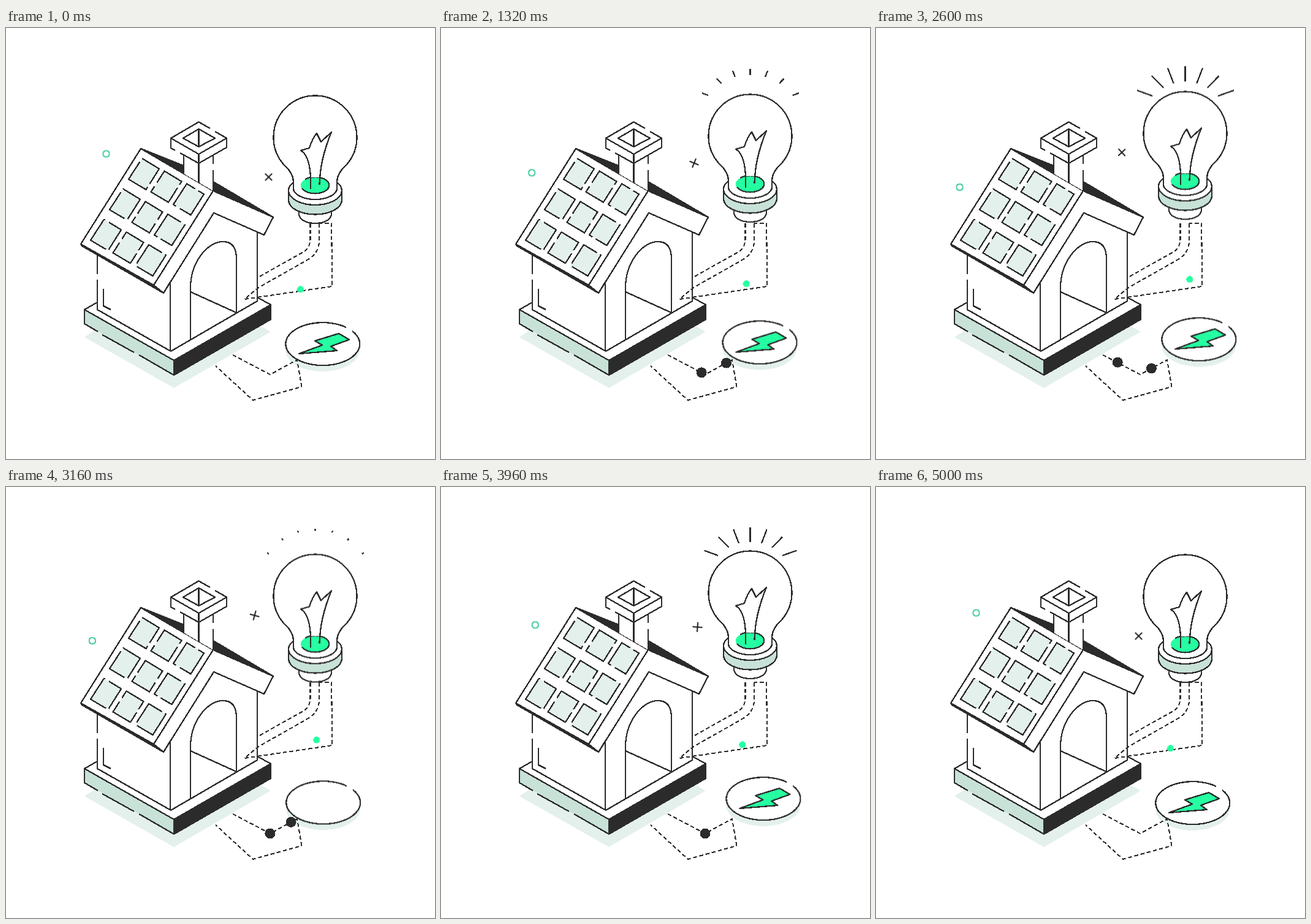
These frames come from a looping animation (700x704 px, 5040 ms). An HTML page:

```html
<!DOCTYPE html>
<html lang="en">
<head>
<meta charset="utf-8">
<title>Solar house</title>
<style>
  html, body { margin: 0; width: 100%; height: 100%; overflow: hidden; background: #fff; }
  svg { display: block; width: 100vw; height: 100vh; }
  svg {
    --ink: #2b2b2b; --mint: #c8e2d8; --pale: #e3f0ec; --neon: #25ffa2;
    --sine: cubic-bezier(.37, 0, .63, 1);
    fill: none; stroke: var(--ink); stroke-width: 2.3; stroke-linejoin: round;
    shape-rendering: crispEdges;
  }
  .white { fill: #fff; }
  .ink { fill: var(--ink); }
  .mint { fill: var(--mint); }
  .pale { fill: var(--pale); }
  .neon { fill: var(--neon); }
  .bare { stroke: none; }
  .dash { stroke-dasharray: 6.5 4; stroke-width: 2.1; }

  .bulb, .disc, .rays line, .bolt { animation: 1680ms var(--sine) -40ms infinite; }
  .bulb { animation-name: lift; }
  .disc { animation-name: hover; }
  .bolt { animation-name: blink; animation-timing-function: step-end; }
  .rays line { animation-name: trim; stroke-dasharray: 1 3; }
  @keyframes lift { 50% { transform: translate(0, -7px); } }
  @keyframes hover { 50% { transform: translate(10.7px, -8px); } }
  @keyframes blink { 0% { opacity: 1; } 88% { opacity: 0; } 94% { opacity: 1; } }
  @keyframes trim {
    0% { stroke-dashoffset: 1.01; }
    50% { stroke-dashoffset: 0; animation-timing-function: cubic-bezier(.42, 0, .7, .97); }
    100% { stroke-dashoffset: -1.01; }
  }

  .drift { animation: drift 5040ms var(--sine) -40ms infinite; }
  .spin { animation: spin 5040ms var(--sine) -40ms infinite; }
  @keyframes drift {
    0%, 100% { transform: translate(var(--from)); }
    50% { transform: translate(var(--to)); }
  }
  @keyframes spin { 50% { transform: rotate(-360deg); } }

  .pulse {
    animation: travel 5040ms var(--sine) infinite, pop 5040ms linear infinite;
    animation-delay: calc(var(--start) - 5080ms);
  }
  @keyframes travel {
    0% { translate: 475px 542px; }
    23.81% { translate: 431px 566px; }
    39.29%, 100% { translate: 372px 534px; }
  }
  @keyframes pop {
    0%, 1% { scale: 0; }
    2.5%, 37.5% { scale: 1; }
    39.29%, 100% { scale: 0; }
  }
</style>
</head>
<body>
<svg viewBox="0 0 700 704">
  <path class="pale bare" d="M128 505 274 588 432 496 274 410Z"/>

  <!-- plinth -->
  <path class="white bare" d="M128 460 274 543 432 452 274 370Z"/>
  <path class="mint bare" d="M128 460 274 543V567L128 483Z"/>
  <path class="ink" d="M274 543 432 452V476L274 567Z"/>
  <path d="M149 448 128 460 274 543V567L217 534M209 530 157 501M150 496 128 483V460M410 440 432 452"/>

  <!-- walls and door -->
  <path class="white bare" d="M149 360V460L269 528 410 446V330L339 290Z"/>
  <path d="M149 372V402M149 411V460L269 528 410 446V334M268 416V528"/>
  <path d="M159 426V454L171 460"/>
  <path d="M301 509V425C301 382 329 349 354 349C370 349 376 360 376 377V465L301 431"/>

  <!-- roof -->
  <path class="white bare" d="M220 197 338 266 436 309 421 338 339 302 257 433 122 353Z"/>
  <path class="ink bare" d="M338 250 436 309 338 267ZM220 197 291 225V239Z"/>
  <path d="M338 266 220 197 122 353 241 420 338 266 436 309 421 338 339 302 257 433 241 420M220 197 290 225M338 251 436 309"/>
  <path class="ink" d="M122 353 241 420 257 433 124 356Z"/>
  <path class="white bare" d="M243 419 261 391 266 416 257 430Z"/>
  <path d="M241 420 262 387M257 433 268 415"/>
  <g id="panels" class="pale"></g>

  <!-- chimney -->
  <path class="white bare" d="M290 200V238L338 266V200Z"/>
  <path d="M290 207V238M338 208V222M338 232V266M314.5 206V253"/>
  <path class="white bare" d="M314.5 153.5 360 180V195L314.5 221 269 196V180Z"/>
  <path d="M341 169 360 180 314.5 206 269 180 314.5 153.5 333 164M269 180V196L276 200M284 204 314.5 221 360 195V180M314.5 206V221"/>
  <path d="M314.5 165 341 180 314.5 194 289 180ZM314.5 165V194"/>

  <g class="disc">
    <ellipse class="pale bare" cx="516.5" cy="526" rx="60.5" ry="35"/>
    <ellipse class="white bare" cx="517.5" cy="516.5" rx="60.5" ry="35"/>
    <path d="M565 495A60.5 35 0 1 1 555 489"/>
    <path class="bolt neon" d="M478 532 516 518 504 511 543 499 560 509 530 520 540 527Z"/>
  </g>

  <g class="dash">
    <path d="M496.5 319V345Q496 360 485 366L410 408"/>
    <path d="M511 319V347C511 366 500 374 488 381L412 424 389 443 532.5 422 531 319H511"/>
    <path d="M370 534 431 566 475 542 482.5 586 403 608 342 552"/>
  </g>

  <g class="ink bare">
    <circle class="pulse" r="8.5" style="--start: 0ms"/>
    <circle class="pulse" r="8.5" style="--start: 990ms"/>
    <circle class="pulse" r="8.5" style="--start: 1980ms"/>
    <circle class="pulse" r="8.5" style="--start: 2820ms"/>
  </g>

  <g class="bulb">
    <g id="rays" class="rays"></g>
    <path class="white" d="M478 299V305C480 314 491 319 504.5 319S529 314 531 305V299"/>
    <path class="mint" d="M461 265V281A43.5 23.5 0 0 0 548 281V265"/>
    <ellipse class="white" cx="504.5" cy="265.5" rx="43.5" ry="23.5"/>
    <path class="white" d="M469 262V252C469 240 462 231 454 224A68 68 0 1 1 555 224C546 232 540 241 540 252V262A35.5 18 0 0 1 469 262"/>
    <ellipse class="neon bare" cx="504" cy="257" rx="23" ry="13.5"/>
    <path d="M488 247.3A23 13.5 0 1 1 483 262"/>
    <path class="white bare" d="M497 244C497 224 494 207 481 200L495 196 507 172 514 186 531 170C520 196 514 220 512 244Z"/>
    <path d="M497 263C498 232 494 207 481 200L495 196Q500 180 507 172L514 186 531 170C519 199 512 228 511.5 256"/>
  </g>

  <g class="drift" style="--from: 163.5px, 205.5px; --to: 136.3px, 260.3px">
    <circle r="5.4" stroke="#4fcfa0"/>
  </g>
  <g class="drift" style="--from: 480.5px, 427px; --to: 512px, 410.5px">
    <circle class="neon bare" r="5.6"/>
  </g>
  <g class="drift" style="--from: 428.5px, 243.5px; --to: 401px, 203px">
    <path class="spin" stroke-width="2" d="M-5.8-5.8 5.8 5.8M-5.8 5.8 5.8-5.8"/>
  </g>
</svg>
<script>
  const add = (id, tag, attrs) => {
    const el = document.createElementNS("http://www.w3.org/2000/svg", tag);
    for (const key in attrs) el.setAttribute(key, attrs[key]);
    document.getElementById(id).append(el);
  };

  // Solar cells, each outline broken at a different spot
  for (let row = 0; row < 3; row++) {
    for (let col = 0; col < 3; col++) {
      add("panels", "path", {
        d: `M${222 + col * 36.5 - row * 31} ${213 + col * 20.7 + row * 49.8}l28 17-21.5 34-28.5-17Z`,
        "stroke-dasharray": "62 6 72 7",
        "stroke-dashoffset": (row * 3 + col) * 23
      });
    }
  }

  // Rays, from the glass outwards
  const rays = [
    [452, 118, 426, 108.5], [470, 105, 450, 85], [486, 98, 476, 72], [504.5, 95.5, 504.5, 68.5],
    [523, 98, 533, 72], [540, 105, 559.5, 85], [557, 118, 584, 108.5]
  ];
  for (const [x1, y1, x2, y2] of rays) add("rays", "line", { x1, y1, x2, y2, pathLength: 1 });
</script>
</body>
</html>
```
